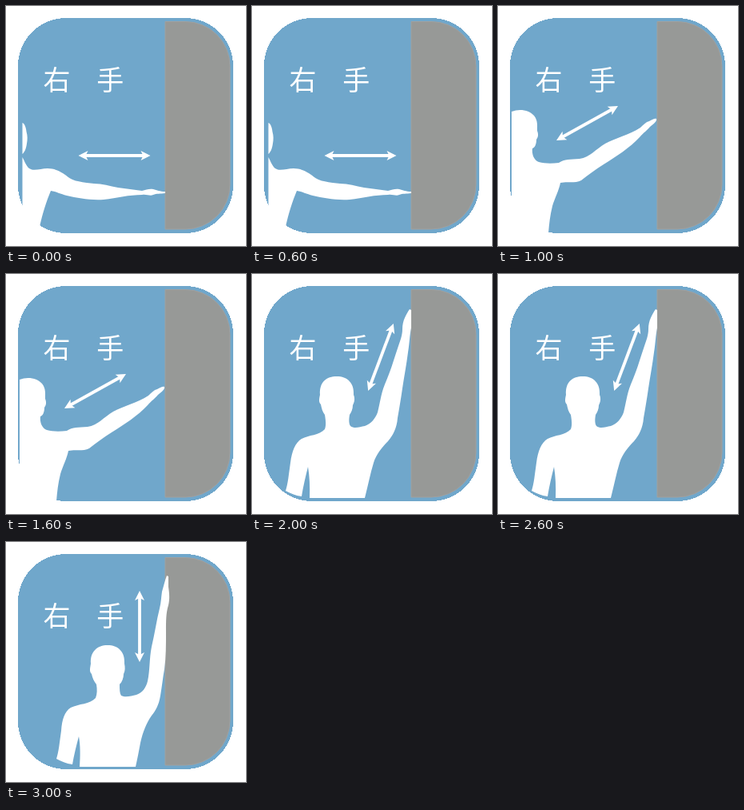
Write an HTML page that moves like this. It is 300 by 300 pixels and loops after 4000 ms.

```html
<!DOCTYPE html>
<html lang="ja">
<head>
<meta charset="utf-8">
<title>右手のストレッチ</title>
<style>
  html, body { margin: 0; width: 100%; height: 100%; overflow: hidden; background: #fff; }
  svg { display: block; width: 100%; height: 100%; }
  text { font: 500 34px "Noto Sans CJK JP", "Noto Sans CJK", sans-serif; letter-spacing: -.6px; fill: #fff; white-space: pre; }
  .pose { fill: #fff; visibility: hidden; animation: show 4s step-end infinite; animation-delay: calc((var(--i) - 4) * 1s); }
  .arrow { stroke: #fff; stroke-width: 3.8; marker-start: url(#tip); marker-end: url(#tip); }
  @keyframes show {
    0% { visibility: visible; }
    25%, 100% { visibility: hidden; }
  }
</style>
</head>
<body>
<svg viewBox="0 0 300 300">
  <defs>
    <marker id="tip" markerUnits="userSpaceOnUse" markerWidth="14" markerHeight="14"
            viewBox="-7 -7 14 14" refX="-2" refY="0" orient="auto-start-reverse">
      <path d="M6 0L-6 -6L-3 0L-6 6Z" fill="#fff"/>
    </marker>
  </defs>

  <rect x="15" y="15" width="269" height="269" rx="60" fill="#70a7cb" shape-rendering="crispEdges"/>
  <path d="M199 19.500H224A56 56 0 0 1 280 75.500V223A56 56 0 0 1 224 279H199Z"
        fill="#979997" stroke="#a0a1a0"/>
  <text x="46.500" y="105">右　手</text>

  <!-- arm level -->
  <g class="pose" style="--i:0">
    <path d="M20.500 146C23 147 25 151 25.500 157C27 162 27 167 26 172C25 179 23 183 20.500 185Z"/>
    <path d="M20.500 189C23 193 25 200 29 203C35 207 43 203 52 203C60 203 66 206 71 209
      C77 213 82 218 90 219C98 221 104 221 110 222C120 222 130 225 140 227
      C150 228 160 230 170 231C175 230 179 228 184 229C189 230 192 232 199 232V234
      C193 235 188 234 184 236C180 238 176 235 170 236C154 236 139 240 122 242
      C104 243 90 240 76 237C68 235 63 232 56 231C51 243 46 258 42 276L40 286H20.500Z"/>
    <line class="arrow" x1="98.500" y1="187" x2="172.500" y2="187"/>
  </g>

  <!-- arm rising -->
  <g class="pose" style="--i:1">
    <path d="M17 132C27 128 39 130 45 137C50 143 49 150 49 156C51 161 50 164 48 167
      C48 173 46 177 43 178C42 185 45 193 51 195C58 197 67 197 76 196
      C83 191 91 192 102 191C115 189 122 179 134 172C147 165 164 161 178 152
      C182 148 185 145 189 144C193 142 196 140 198 141C199 144 194 148 190 151
      C186 156 182 158 177 164C165 177 148 188 132 198C122 204 113 211 104 218
      C96 222 86 219 78 221C76 231 71 240 68 250C65 262 64 272 63 284H17Z"/>
    <line class="arrow" x1="80" y1="164" x2="143" y2="129"/>
  </g>

  <!-- arm high -->
  <g class="pose" style="--i:2">
    <path d="M42 271C45 262 46 250 48 236C50 221 54 211 62 206C71 201 84 202 91 194
      C93 189 92 182 91 176C88 172 87 168 86 163C83 160 84 156 85 151
      C84 135 93 128 106 128C119 128 128 136 127 151C129 156 128 160 126 164
      C126 169 124 173 122 176C121 182 121 187 123 190C128 194 135 191 141 190
      C149 187 154 181 157 173C160 162 161 150 166 138C173 122 177 108 182 93
      C185 84 188 77 188 69C188 58 193 50 197 44L199 45V67
      C197 77 197 86 195 98C193 114 190 129 188 143C186 157 184 168 182 180
      C181 193 176 202 170 209C162 217 155 226 152 236C148 249 145 264 141 280H72
      C72.500 266 72 253 70 241C67 253 64 265 62 278C54 277 48 274 42 271Z"/>
    <line class="arrow" x1="148" y1="138.500" x2="174" y2="69.500"/>
  </g>

  <!-- arm upright -->
  <g class="pose" style="--i:3">
    <path d="M63 271C66 262 67 250 69 236C70 222 73 212 81 207C91 202 105 203 112 195
      C114 190 114 184 113 178C110 174 108 170 107 165C104 162 105 158 106 152
      C105 137 114 129 127 129C140 129 149 137 148 152C149 157 149 161 147 165
      C147 170 145 175 142 178C142 184 142 189 144 192C150 195 157 192 163 191
      C171 188 175 182 177 174C180 160 179 146 182 131C186 114 188 99 192 83
      C194 75 194 68 195 62C197 55 199 47 201 42L203 43V56C204 63 205 71 203 79
      C200 88 200 99 200 112C200 128 200 144 198 159C196 170 195 180 193 192
      C191 204 187 211 182 217C175 227 171 238 168 251C166 262 164 272 162 281H92
      C93 267 93 254 91 243C88 254 85 266 83 278C75 277 69 274 63 271Z"/>
    <line class="arrow" x1="167" y1="69" x2="167" y2="142"/>
  </g>
</svg>
</body>
</html>
```
